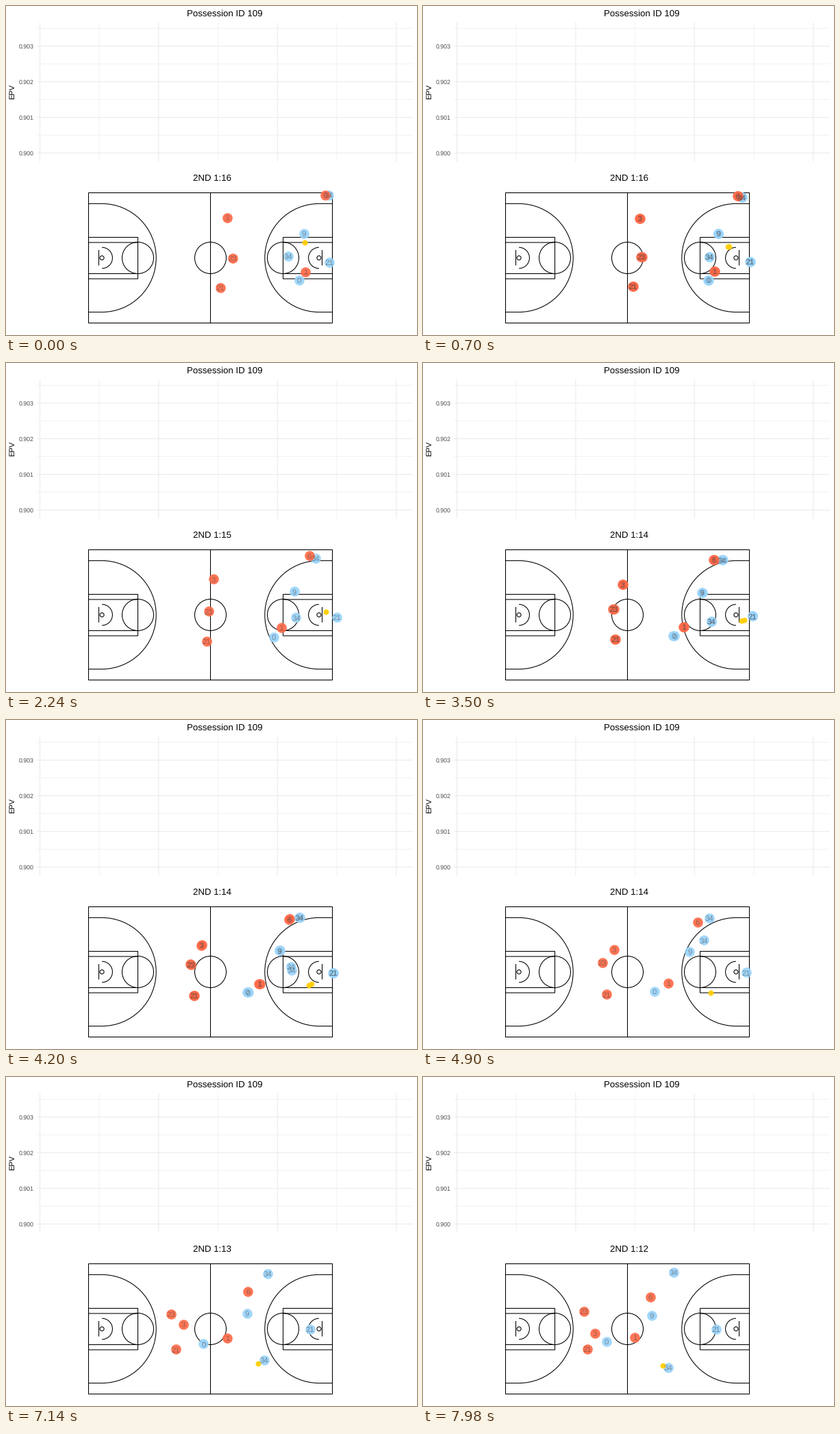
Recreate the animation shown at these times as a matplotlib script. Size 600 by 480 pixels, loop 8 s.

```python
import numpy as np
import matplotlib.pyplot as plt
from matplotlib.animation import FuncAnimation
from matplotlib.patches import Arc, Circle, Rectangle

W, H, DPI = 600, 480, 72
TICK, STEP = 20, 7           # ms per tick, ticks per picture
FRAMES = 400
LAST = 83                    # last tracked moment, 25 per second

plt.rcParams.update({"font.family": "Liberation Sans", "path.snap": False,
                     "text.hinting": "none"})

# Each player runs a parabola: number, start, end, offset at mid-run
RED = [
    ("6", (465.5, 276), (332, 321), (18, -9)),
    ("3", (323, 309), (251, 373.5), (0, -14.5)),
    ("23", (331, 367.5), (235, 342), (-11, 2.4)),
    ("21", (313, 411), (240, 396.5), (0, -1.8)),
    ("1", (437, 387.5), (309, 380), (0, 1)),
]
BLUE = [
    ("9", (434.5, 332), (334, 348), (17.5, -4)),
    ("34", (471, 276), (366, 285), (12.3, 7.5)),
    ("34", (412, 364.5), (358, 424), (33, -12)),
    ("21", (472, 374), (428, 368), (28.7, -2)),
    ("0", (428, 399.5), (267.5, 386), (9, 4.7)),
]
CUTTER = 2                   # the blue player who darts up court and back

# Ball: through the hoop, inbound pass, dribble (moment, x, y)
BALL = np.array([(0, 436, 345), (33, 480, 371.5), (37, 465.3, 375.5),
                 (51, 419.5, 398), (64, 388.5, 415), (LAST, 349.5, 421)])


def run(player, m):
    start, end, bend = np.array(player[1:], float)
    u = m / LAST
    return start + (end - start) * u + bend * 4 * u * (1 - u)


def red_spots(m):
    return np.array([run(p, m) for p in RED])


def blue_spots(m):
    spots = np.array([run(p, m) for p in BLUE])
    spots[CUTTER, 1] -= 72 * np.exp(-0.5 * ((m - 53) / 6.1) ** 2)
    return spots


def ball_spot(m):
    t, x, y = BALL.T
    return np.array([(np.interp(m, t, x), np.interp(m, t, y))])


def first_moment(k):
    """Pictures hold one or two moments, about 1.45 on average."""
    return k + int(0.451 * k + 0.309)


fig = plt.figure(figsize=(W / DPI, H / DPI), dpi=DPI, facecolor="white")
ax = fig.add_axes([0, 0, 1, 1])
ax.set_xlim(0, W)
ax.set_ylim(H, 0)
ax.axis("off")


def line(x, y, color="black", lw=1.07, z=2):
    ax.plot(x, y, color=color, lw=lw, zorder=z, solid_capstyle="butt")


def label(x, y, text, size, ha="center", **style):
    return ax.text(x, y, text, size=size, ha=ha, va="baseline", **style)


def draw_chart():
    left, right, top, bottom = 45, 594, 24, 227
    grid = "#EBEBEB"
    for i in range(4):
        y = 58.5 + 52 * i
        line((left, right), (y, y), grid, z=1)
        line((left, right), (y - 26, y - 26), grid, 0.6, z=0)
        label(40.7, y + 3.2, f"{0.903 - 0.001 * i:.3f}", 8.8, "right",
              color="#4D4D4D")
        x = 49.5 + 173.4 * i
        line((x, x), (top, bottom), grid, z=1)
        if i < 3:
            line((x + 86.7, x + 86.7), (top, bottom), grid, 0.6, z=0)
    label(319.7, 15.2, "Possession ID 109", 13.2)
    ax.text(9.6, 125, "EPV", size=11, rotation=90, ha="center", va="center")


def draw_court():
    pen = dict(ec="black", lw=1.07, zorder=2)
    x0, x1, y0, y1, cy = 120.5, 476.5, 272.5, 462.5, 367.5
    mid = (x0 + x1) / 2

    def ring(x, r):
        ax.add_patch(Circle((x, cy), r, fill=False, **pen))

    ax.add_patch(Rectangle((x0, y0), x1 - x0, y1 - y0, fill=False, **pen))
    line((mid, mid), (y0, y1))
    ring(mid, 23)
    for base, d in ((x0, 1), (x1, -1)):
        key, hoop, board = base + 72 * d, base + 19.6 * d, base + 15 * d
        ax.add_patch(Rectangle((base, 337.5), 72 * d, 60.5, fill=False, **pen))
        for y in (345, 390.5):
            line((base, key), (y, y))
        ring(key, 23)
        ring(hoop, 3)
        line((board, board), (356, 378.5))
        for r in (15.3, 79.1):
            ax.add_patch(Arc((hoop, cy), 2 * r, 2 * r, theta1=-90 * d,
                             theta2=180 - 90 * d, **pen))
        for y in (cy - 79.1, cy + 79.1):
            line((base, hoop), (y, y))


def dots(color, size, z):
    return ax.scatter([], [], s=size ** 2, c=color, alpha=0.92, lw=0, zorder=z)


draw_chart()
draw_court()
clock = label(301.2, 255.2, "", 13.2)
groups = [
    (dots("#9AD4FB", 14.6, 3), blue_spots),
    (dots("#FF6A48", 14.6, 4), red_spots),
    (dots("#FFCD00", 8, 5), ball_spot),
]
numbers = [[label(0, 0, p[0], 11.4, color="#404040", alpha=0.5, zorder=6)
            for p in BLUE + RED] for _ in range(2)]


def update(i):
    k = i // STEP
    moments = range(first_moment(k), first_moment(k + 1))
    for group, spots in groups:
        group.set_offsets(np.vstack([spots(m) for m in moments]))
    for row, texts in enumerate(numbers):
        shown = row < len(moments)
        m = moments[row if shown else 0]
        for text, (x, y) in zip(texts, np.vstack([blue_spots(m), red_spots(m)])):
            text.set_position((x, y + 4.2))
            text.set_visible(shown)
    clock.set_text(f"2ND 1:{16 - (moments[0] + 17) // 25}")
    return [clock]


anim = FuncAnimation(fig, update, frames=FRAMES, interval=TICK,
                     repeat=True, repeat_delay=0, blit=False)
plt.show()
```
